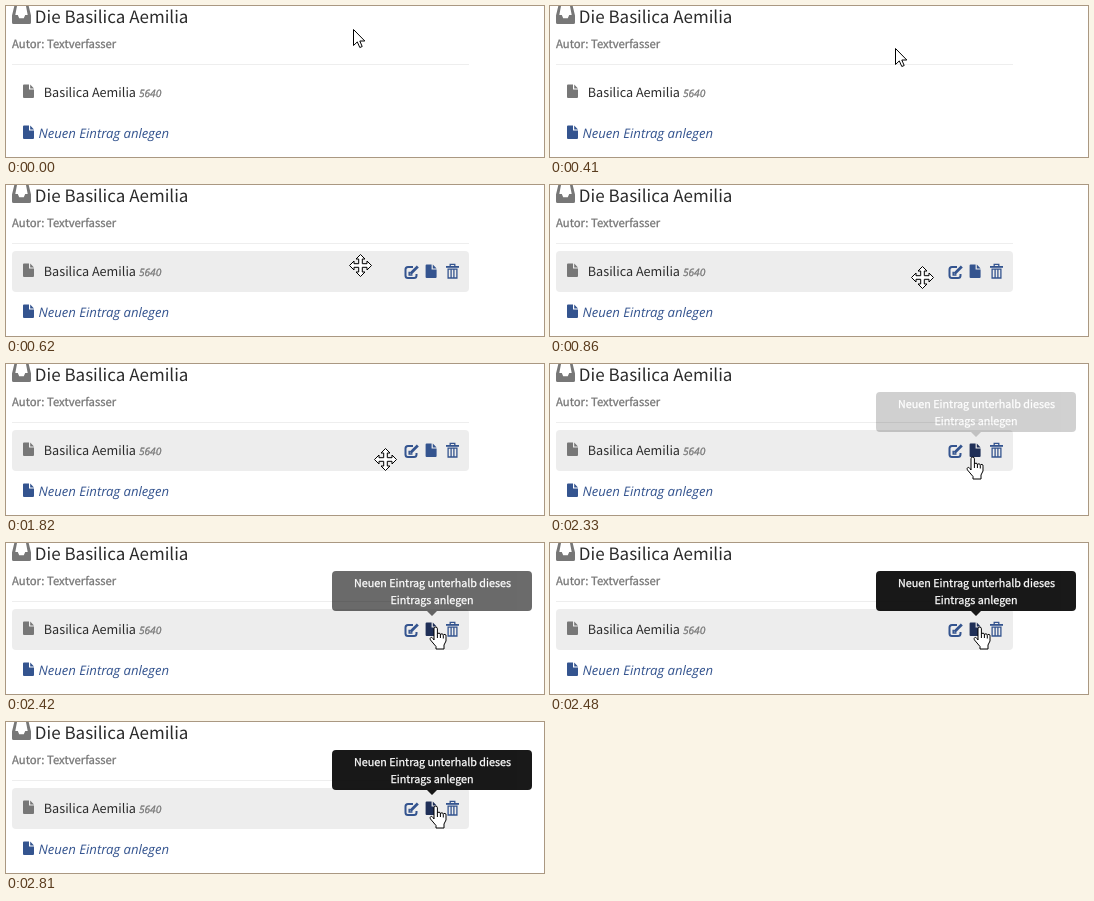
An HTML page for the animation above (6110 ms loop, 538x151 px).

```html
<!DOCTYPE html>
<html lang="de">
<head>
<meta charset="utf-8">
<title>Eintrag anlegen</title>
<style>
html, body { margin: 0; width: 100%; height: 100%; overflow: hidden; background: #fff; }
svg { display: block; width: 538px; height: 151px; }
text {
  font-family: "Noto Sans CJK JP", "Noto Sans CJK SC", "Noto Sans CJK", "Open Sans", sans-serif;
  text-rendering: geometricPrecision;
}
.slanted { font-family: "Open Sans", "Noto Sans", sans-serif; font-style: italic; }
.dark { fill: #2b2b2b; }
.muted { fill: #777; }
.link { fill: #34548f; }
.firm { stroke: #777; stroke-width: .3; }
.pointer { fill: #fff; stroke: #000; stroke-linejoin: round; }
</style>
</head>
<body>
<svg viewBox="0 0 538 151">
  <defs>
    <path id="file" d="M1 0H6V5H11V12.5Q11 13.5 10 13.5H1Q0 13.5 0 12.5V1Q0 0 1 0ZM7.2 0L11 3.9H7.2Z"/>
  </defs>

  <path class="muted" d="M8.3 0H11L9.3 9H11.8L13.2 12.3H17.8L19.2 9H21.7L20 0H22.7L25 9.5V16.5Q25 18 23.5 18H7.5Q6 18 6 16.5V9.5Z"/>
  <text class="dark" x="28.8" y="17" font-size="17">Die Basilica Aemilia</text>
  <text class="muted firm" x="6" y="42" font-size="11.3">Autor: Textverfasser</text>
  <path d="M6 58.5H463" stroke="#eee"/>

  <rect id="row" x="6" y="66" width="457" height="41" rx="4" fill="#ededed"/>
  <use class="muted" href="#file" x="17" y="78.5"/>
  <text class="dark" x="37.8" y="91" font-size="12.65">Basilica Aemilia</text>
  <text class="muted slanted firm" x="132.9" y="91" font-size="10.2">5640</text>

  <use class="link" href="#file" x="17" y="119.5"/>
  <text class="link slanted" x="32.5" y="132" font-size="13.15">Neuen Eintrag anlegen</text>

  <g id="actions" transform="translate(0 -.5)">
    <g fill="none" stroke="#34548f">
      <path stroke-width="2" d="M407 82.5H402Q399.5 82.5 399.5 85V91Q399.5 93.5 402 93.5H408Q410.5 93.5 410.5 91V89.5"/>
      <path stroke-width="2.8" d="M404.5 89.3L411.8 82"/>
      <path stroke-width="1.5" d="M403.2 87.3V90.6H406.5"/>
    </g>
    <use id="add" href="#file" x="419.6" y="80"/>
    <g fill="none" stroke="#34548f">
      <path stroke-width="1.8" d="M440 82.4H453"/>
      <path stroke-width="1.3" d="M444.2 82V79.8H448.8V82"/>
      <path stroke-width="1.3" d="M442.1 84V93.5H450.9V84M445.1 85V93M447.9 85V93M441.5 84.7H451.5"/>
    </g>
  </g>

  <g id="tip" text-anchor="middle" font-size="10.75">
    <path d="M330 28H522Q526 28 526 32V64Q526 68 522 68H431L426 73L421 68H330Q326 68 326 64V32Q326 28 330 28Z"/>
    <g fill="#fff" stroke="#fff" stroke-width=".25">
      <text x="426.5" y="44">Neuen Eintrag unterhalb dieses</text>
      <text x="426" y="61">Eintrags anlegen</text>
    </g>
  </g>

  <path id="arrow" class="pointer" d="M.5 .5V16.5L4.3 12.9L6.8 18.5L9.2 17.5L6.8 12H11.8Z"/>
  <path id="move" class="pointer"/>
  <path id="hand" class="pointer" d="M-1.5 13.5V2.3a1.7 1.7 0 0 1 3.4 0V8a1.5 1.5 0 0 1 3 .3a1.5 1.5 0 0 1 2.9 .6a1.4 1.4 0 0 1 2.7 .8
    V14.5L8.5 18.5V22.5H.5V20L-5 13.5C-6.3 11.3 -4 10 -2.7 11.8Z M1.9 8V11.5M4.9 8.3V11.5M7.8 9V12"/>
</svg>
<script>
const LOOP = 6110, STEP = 30, OFFSET = 290 % STEP;
const byId = id => document.getElementById(id);
const [row, actions, add, tip, arrow, move, hand] =
  ["row", "actions", "add", "tip", "arrow", "move", "hand"].map(byId);

// [time, x, y] of the pointer's hot spot
const path = [
  [260, 347, 23], [410, 345, 42], [530, 348, 67], [650, 356, 84], [860, 372, 92],
  [1790, 372, 92], [1820, 379, 95], [1910, 395, 98], [2000, 408, 98],
  [2240, 417, 97], [2330, 422, 92], [2420, 429, 83]
];
const fade = [[2285, 0], [2330, .18], [2420, .58], [2480, .9]];

// One arm of the four-way pointer, turned in quarter steps
const arm = [[-1.8, -1.8], [-1.8, -6.5], [-4.5, -6.5], [0, -11], [4.5, -6.5], [1.8, -6.5]];
const turn = ([x, y], n) => n ? turn([-y, x], n - 1) : [x, y];
const outline = [0, 1, 2, 3].flatMap(n => arm.map(p => turn(p, n)));
move.setAttribute("d", "M" + outline.join("L") + "Z");

function sample(keys, t) {
  const i = keys.findIndex(k => k[0] > t);
  if (i === 0) return keys[0].slice(1);
  if (i < 0) return keys[keys.length - 1].slice(1);
  const a = keys[i - 1], b = keys[i], f = (t - a[0]) / (b[0] - a[0]);
  return a.slice(1).map((v, j) => v + (b[j + 1] - v) * f);
}

const show = (el, on) => el.setAttribute("visibility", on ? "visible" : "hidden");

function draw(time) {
  const t = Math.floor((time - OFFSET) / STEP) * STEP + OFFSET;
  const [x, y] = sample(path, t).map(Math.round);
  const onRow = y >= 66, onAction = onRow && x >= 398;
  const active = onAction ? hand : onRow ? move : arrow;
  const shift = active === arrow ? 0 : .5;

  show(row, onRow);
  show(actions, onRow);
  add.setAttribute("fill", x >= 417 ? "#1f2f57" : "#34548f");
  tip.setAttribute("opacity", sample(fade, t)[0]);
  for (const el of [arrow, move, hand]) show(el, el === active);
  active.setAttribute("transform", `translate(${x + shift} ${y + shift})`);
}

const start = performance.now();
function tick() {
  draw((performance.now() - start) % LOOP);
  requestAnimationFrame(tick);
}
tick();
</script>
</body>
</html>
```
